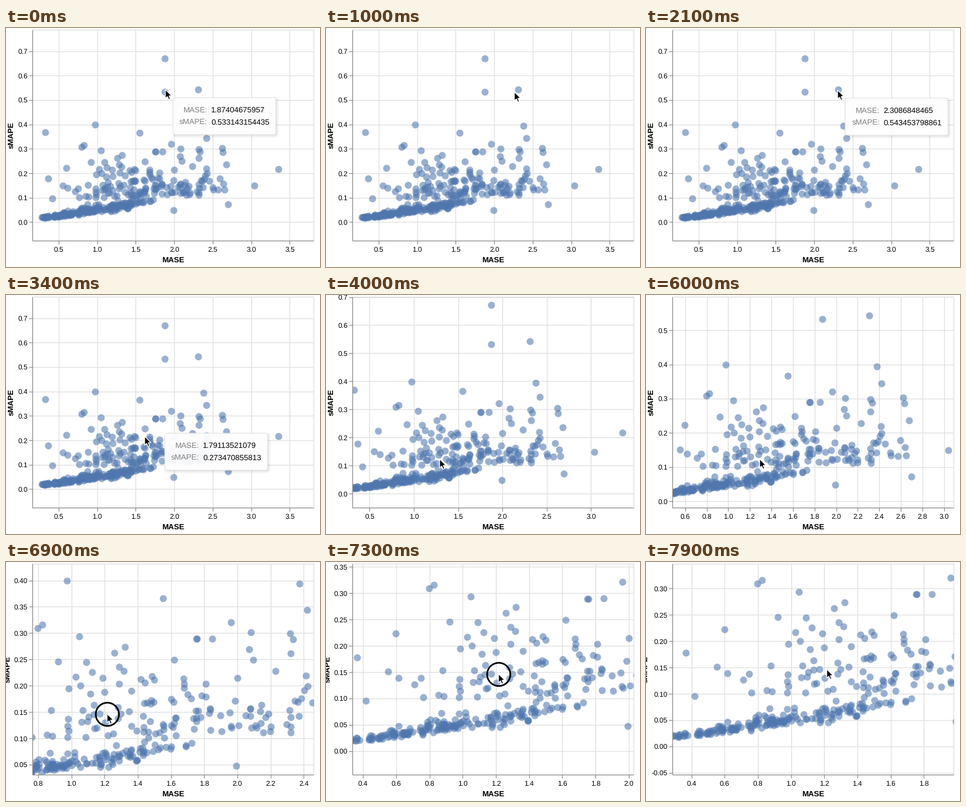
Write a matplotlib script that moves like this. It is 536 px wide and 408 px high and loops after 8000 ms.

```python
import math

import matplotlib.pyplot as plt
import numpy as np
from matplotlib.animation import FuncAnimation
from matplotlib.patches import Circle, FancyBboxPatch, Polygon, Rectangle

W, H, DPI = 536, 408, 100
PT = 72 / DPI                      # points per pixel
LEFT, RIGHT, TOP, BOTTOM = 44.6, 524.6, 3.4, 363
FOCUS = (194, 280)                 # pixel the wheel zooms about
FOCUS_DATA = (1.291, 0.1235)
UNIT = (131.5, 417)                # pixels per data unit at zoom 1
BLUE, GRID, AXIS = "#4f77ae", "#dddddd", "#888888"
LINE = 1.2 * PT

plt.rcParams["font.family"] = ["Liberation Sans", "DejaVu Sans"]
plt.rcParams["text.hinting"] = "none"

# points that stand clear of the cloud
LONE = [
    (1.873, .671), (1.874, .533), (2.309, .543), (2.375, .394), (2.42, .344),
    (3.355, .217), (.325, .369), (.975, .399), (1.552, .366), (.798, .309),
    (.826, .3155), (1.048, .294), (1.321, .274), (.598, .223), (.365, .178),
    (.552, .151), (.418, .096), (1.962, .321), (2.083, .302), (2.62, .304),
    (2.63, .286), (2.319, .299), (2.32, .262), (3.038, .149), (2.696, .072),
    (1.994, .048),
]


def make_points():
    rng = np.random.default_rng(11)
    # dense band that rises and widens to the right
    n = 185
    x = .26 + 1.65 * rng.beta(1.5, 2.1, n)
    y = np.maximum(.021, .019 + .052 * (x - .33))
    y = np.maximum(y + rng.gumbel(-.004, .0065, n) * x, .018)
    # loose cloud above it, thinning upwards
    m = 138
    cx = .55 + 2.33 * rng.beta(2, 2.6, m)
    cy = .112 - .09 * np.exp(-2 * cx) + np.minimum(rng.exponential(.055, m), .18)
    return np.vstack([LONE, np.column_stack([x, y]), np.column_stack([cx, cy])])


POINTS = make_points()


def linear(t):
    return t


def smooth(t):
    return t * t * (3 - 2 * t)


# moves: first step, last step, easing, goal (one step is 100 ms)
START = (272, 105)
MOVES = [
    (1, 10, smooth, (321.5, 109)), (12, 15, smooth, (327, 106)),
    (21, 29, smooth, (332, 163)), (29, 33, linear, (258, 222)),
    (33, 36, linear, (194, 280)), (67, 69, smooth, (172.5, 259)),
    (69, 74, smooth, (308.5, 183)),
]
ZOOMS = [
    (37, 41, linear, 1.2), (45, 47, linear, 1.233), (50, 52, linear, 1.294),
    (55, 60, linear, 1.4), (63, 67, linear, 2.155),
]
PRESS, RELEASE = 69, 76

# first step, last step, values
TIPS = [
    (0, 3, "1.87404675957", "0.533143154435"),
    (13, 22, "2.3086848465", "0.543453798861"),
    (29, 29, "2.37502816394", "0.394127730518"),
    (33, 34, "1.79113521079", "0.273470855813"),
]
ARROW = np.array([(0, 0), (0, 15.2), (3.5, 12), (6, 17.4), (8.5, 16.3),
                  (6.1, 11), (10.8, 10.7)])


def track(i, value, moves):
    """Value at step i after the eased moves made so far."""
    value = np.asarray(value, float)
    for first, last, ease, goal in moves:
        t = min(max((i - first) / (last - first), 0), 1)
        value = value + (np.asarray(goal) - value) * ease(t)
    return value


def cursor_at(i):
    return track(i, START, MOVES)


def ticks(lo, hi, count):
    raw = (hi - lo) / count
    base = 10 ** math.floor(math.log10(raw))
    ratio = raw / base
    factor = (10 if ratio >= 50 ** .5 else 5 if ratio >= 10 ** .5
              else 2 if ratio >= 2 ** .5 else 1)
    step = base * factor
    digits = max(0, -math.floor(math.log10(step) + 1e-9))
    values = np.arange(math.ceil(lo / step), math.floor(hi / step) + 1) * step
    return [(v, f"{v + 0.0:.{digits}f}") for v in values]


def text_width(s, size):
    em = {".": .278, "-": .333}
    return size * sum(em.get(c, .556) for c in s)


def text(x, y, s, size=12, **kw):
    """Text whose digits are vertically centred on y."""
    ax.text(x, y + .36 * size, s, fontsize=size * PT, va="baseline", **kw)


def line(xs, ys, color, z):
    ax.plot(xs, ys, color=color, lw=LINE, zorder=z, solid_capstyle="butt")


def draw_chart(i):
    zoom = track(i, 1, ZOOMS)
    pan = cursor_at(max(i, PRESS)) - cursor_at(PRESS)
    sx, sy = UNIT[0] * zoom, UNIT[1] * zoom
    ox, oy = FOCUS + pan

    def to_px(x, y):
        return ox + (x - FOCUS_DATA[0]) * sx, oy - (y - FOCUS_DATA[1]) * sy

    def to_data(px, py):
        return FOCUS_DATA[0] + (px - ox) / sx, FOCUS_DATA[1] - (py - oy) / sy

    x0, y0 = to_data(LEFT, BOTTOM)
    x1, y1 = to_data(RIGHT, TOP)

    for v, label in ticks(x0, x1, 10):
        px = to_px(v, 0)[0]
        line([px, px], [TOP, BOTTOM], GRID, 1)
        line([px, px], [BOTTOM, BOTTOM + 6], AXIS, 4)
        text(px, 378, label, ha="center")
    widest = 0
    for v, label in ticks(y0, y1, 8):
        py = to_px(0, v)[1]
        line([LEFT, RIGHT], [py, py], GRID, 1)
        line([LEFT - 6, LEFT], [py, py], AXIS, 4)
        text(36.8, py, label, ha="right")
        widest = max(widest, text_width(label, 12))

    view = Rectangle((LEFT, TOP), RIGHT - LEFT, BOTTOM - TOP, fill=False,
                     ec=GRID, lw=LINE, zorder=1)
    ax.add_patch(view)
    dots = ax.scatter(*to_px(POINTS[:, 0], POINTS[:, 1]), s=(12 * PT) ** 2,
                      c=BLUE, alpha=.58, linewidths=0, zorder=3)
    dots.set_clip_path(view)
    line([LEFT, LEFT], [TOP, BOTTOM], AXIS, 4)
    line([LEFT, RIGHT], [BOTTOM, BOTTOM], AXIS, 4)

    text(285, 395, "MASE", 13.2, ha="center", weight="bold")
    ax.text(13.7 - (widest - text_width("0.0", 12)), 183.5, "sMAPE",
            fontsize=13.2 * PT, weight="bold", rotation=90, ha="center",
            va="baseline", rotation_mode="anchor")


def box(x, y, w, h, r, **kw):
    ax.add_patch(FancyBboxPatch(
        (x, y), w, h, boxstyle=f"round,pad=0,rounding_size={r}", **kw))


def draw_tip(x, y, mase, smape):
    w, h = 175.5, 63
    for grow in np.arange(3.5, -1, -1):
        box(x + 2 - grow, y + 2 - grow, w + 2 * grow, h + 2 * grow, 4 + grow,
            fc="black", alpha=.02, lw=0, zorder=5)
    box(x, y, w, h, 4, fc="white", alpha=.95, lw=0, zorder=6)
    box(x, y, w, h, 4, fc="none", ec="#e5e5e5", lw=LINE, zorder=6)
    for dy, key, value in ((20, "MASE:", mase), (41.5, "sMAPE:", smape)):
        text(x + 59, y + dy, key, 13.2, ha="right", color="#808080", zorder=7)
        text(x + 65, y + dy, value, 13.2, ha="left", zorder=7)


def draw(i):
    ax.cla()
    ax.set_xlim(0, W)
    ax.set_ylim(H, 0)
    ax.axis("off")
    draw_chart(i)
    for first, last, mase, smape in TIPS:
        if first <= i <= last:
            # the tooltip trails the cursor by one step
            draw_tip(*(cursor_at(i - 1) + (13, 14)), mase, smape)
    tip = cursor_at(i)
    if PRESS <= i < RELEASE:
        ax.add_patch(Circle(tip + (.5, 1), 19.8, fill=False, ec="black",
                            lw=2.8 * PT, zorder=8))
    ax.add_patch(Polygon(tip + ARROW, fc="black", ec="white", lw=1.3 * PT,
                         joinstyle="miter", zorder=9))
    return []


fig = plt.figure(figsize=(W / DPI, H / DPI), dpi=DPI, facecolor="white")
ax = fig.add_axes([0, 0, 1, 1])
anim = FuncAnimation(fig, draw, frames=80, interval=100, repeat=True,
                     repeat_delay=0, init_func=lambda: [])
plt.show()
```
